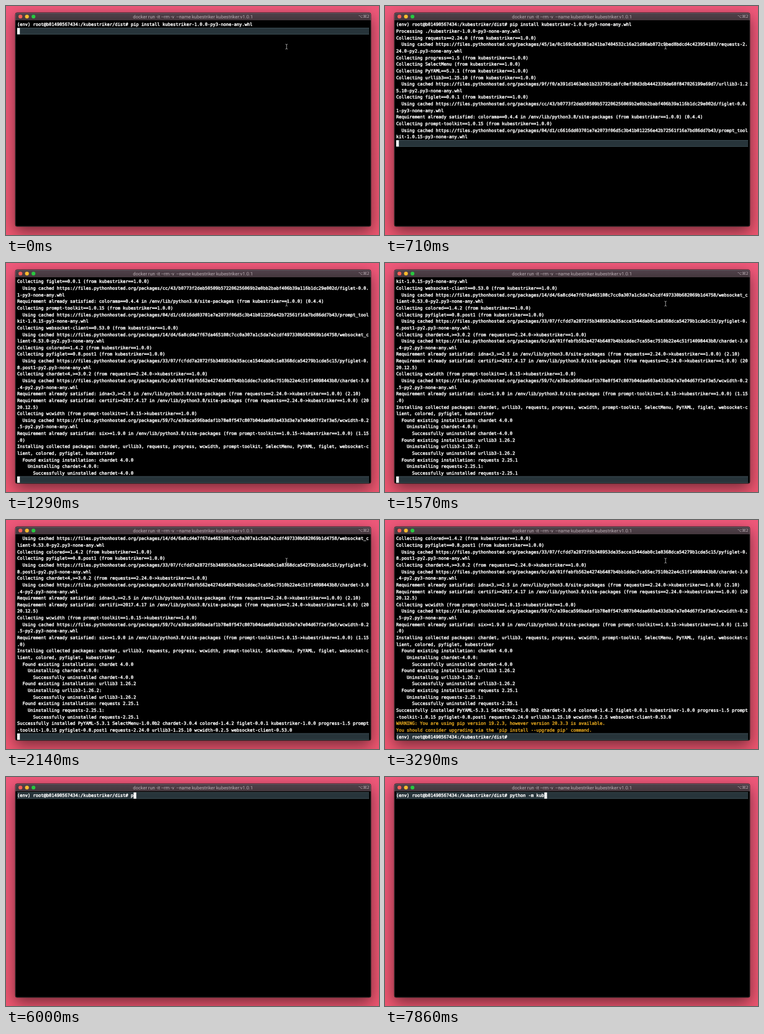
Write an HTML page with a canvas that moves like this. It is 600x369 px and loops after 8000 ms.

```html
<!DOCTYPE html>
<html lang="en">
<head>
<meta charset="utf-8">
<title>Terminal</title>
<style>
html, body { margin: 0; width: 100%; height: 100%; overflow: hidden; background: #ee5673; }
canvas { display: block; width: 600px; height: 369px; }
</style>
</head>
<body>
<canvas id="stage"></canvas>
<script>
const W = 600, H = 369, LOOP = 8000;
const COLS = 133, ROWS = 31;
const LEFT = 18, TOP = 24.5, CELL = 4.256, PITCH = 10.64;
const MONO = '7.07px "DejaVu Sans Mono", monospace';
const WHITE = '#ffffff', AMBER = '#dba01e';

const canvas = document.getElementById('stage');
const ctx = canvas.getContext('2d');
const dpr = window.devicePixelRatio || 1;
canvas.width = W * dpr;
canvas.height = H * dpr;

const PROMPT = '(env) root@b01490567434:/kubestriker/dist# ';
const OWNER = 'kubestriker==1.0.0';
const collect = (name, from = OWNER) => `Collecting ${name} (from ${from})`;
const cached = (path, file) =>
  `  Using cached https://files.pythonhosted.org/packages/${path}/${file}-none-any.whl`;
const satisfied = (name, from, version) =>
  `Requirement already satisfied: ${name} in /env/lib/python3.8/site-packages (from ${from}) (${version})`;
const uninstall = (name, version) => [
  `  Found existing installation: ${name} ${version}`,
  `    Uninstalling ${name}-${version}:`,
  `      Successfully uninstalled ${name}-${version}`
];
const viaRequests = 'requests==2.24.0->' + OWNER;
const viaToolkit = 'prompt-toolkit==1.0.15->' + OWNER;

const log = [
  PROMPT + 'pip install kubestriker-1.0.0-py3-none-any.whl',
  'Processing ./kubestriker-1.0.0-py3-none-any.whl',
  collect('requests==2.24.0'),
  cached('45/1e/0c169c6a5381e241ba7404532c16a21d86ab872c9bed8bdcd4c423954103', 'requests-2.24.0-py2.py3'),
  collect('progress==1.5'),
  collect('SelectMenu'),
  collect('PyYAML==5.3.1'),
  collect('urllib3==1.25.10'),
  cached('9f/f0/a391d1463ebb1b233795cabfc0ef38d3db4442339de68f847026199e69d7', 'urllib3-1.25.10-py2.py3'),
  collect('figlet==0.0.1'),
  cached('cc/43/b0773f2deb50509b572206256069b2e0bb2babf406b39a116b1dc29e002d', 'figlet-0.0.1-py3'),
  satisfied('colorama==0.4.4', OWNER, '0.4.4'),
  collect('prompt-toolkit==1.0.15'),
  cached('04/d1/c6616dd03701e7e2073f06d5c3b41b012256e42b72561f16a7bd86dd7b43', 'prompt_toolkit-1.0.15-py3'),
  collect('websocket-client==0.53.0'),
  cached('14/d4/6a8cd4e7f67da465108c7cc0a307a1c5da7e2cdf497330b682069b1d4758', 'websocket_client-0.53.0-py2.py3'),
  collect('colored==1.4.2'),
  collect('pyfiglet==0.8.post1'),
  cached('33/07/fcfdd7a2872f5b348953de35acce1544dab0c1e8368dca54279b1cde5c15', 'pyfiglet-0.8.post1-py2.py3'),
  collect('chardet<4,>=3.0.2', viaRequests),
  cached('bc/a9/01ffebfb562e4274b6487b4bb1ddec7ca55ec7510b22e4c51f14098443b8', 'chardet-3.0.4-py2.py3'),
  satisfied('idna<3,>=2.5', viaRequests, '2.10'),
  satisfied('certifi>=2017.4.17', viaRequests, '2020.12.5'),
  collect('wcwidth', viaToolkit),
  cached('59/7c/e39aca596badaf1b78e8f547c807b04dae603a433d3e7a7e04d67f2ef3e5', 'wcwidth-0.2.5-py2.py3'),
  satisfied('six>=1.9.0', viaToolkit, '1.15.0'),
  'Installing collected packages: chardet, urllib3, requests, progress, wcwidth, prompt-toolkit, ' +
    'SelectMenu, PyYAML, figlet, websocket-client, colored, pyfiglet, kubestriker',
  ...uninstall('chardet', '4.0.0'),
  ...uninstall('urllib3', '1.26.2'),
  ...uninstall('requests', '2.25.1'),
  'Successfully installed PyYAML-5.3.1 SelectMenu-1.0.0b2 chardet-3.0.4 colored-1.4.2 figlet-0.0.1 ' +
    'kubestriker-1.0.0 progress-1.5 prompt-toolkit-1.0.15 pyfiglet-0.8.post1 requests-2.24.0 ' +
    'urllib3-1.25.10 wcwidth-0.2.5 websocket-client-0.53.0',
  'WARNING: You are using pip version 19.2.3, however version 20.3.3 is available.',
  "You should consider upgrading via the 'pip install --upgrade pip' command."
];

// Hard wrap at the terminal width.
const rows = log.flatMap(line => {
  const color = /^(WARNING|You should)/.test(line) ? AMBER : WHITE;
  return line.match(new RegExp(`.{1,${COLS}}`, 'g')).map(text => ({ text, color }));
});

// [time, value] steps
const PRINTED = [[0, 1], [140, 2], [290, 5], [430, 8], [570, 14], [710, 18], [860, 25], [1000, 31],
  [1140, 38], [1290, 41], [1430, 44], [1570, 47], [2000, 49], [2570, 51]];
const CLEAR_TYPED = [[0, 0], [4860, 1], [5000, 2], [5140, 3], [5290, 4], [5570, 5]];
const RUN_TYPED = [[0, 0], [6000, 1], [7000, 2], [7140, 4], [7290, 6], [7430, 7], [7570, 9],
  [7710, 11], [7860, 13]];
const PROMPT_AT = 2570, CLEAR_AT = 5710, HIDE_POINTER = 4860;

const stepAt = (steps, t) => steps.filter(s => s[0] <= t).pop()[1];
const between = (t, a, b) => t >= a && t < b;

function screenAt(t) {
  if (t >= CLEAR_AT) {
    const text = PROMPT + 'python -m kub'.slice(0, stepAt(RUN_TYPED, t));
    return { lines: [{ text, color: WHITE }], col: text.length };
  }
  const lines = rows.slice(0, stepAt(PRINTED, t));
  const text = t < PROMPT_AT ? '' : PROMPT + 'clear'.slice(0, stepAt(CLEAR_TYPED, t));
  lines.push({ text, color: WHITE });
  return { lines: lines.slice(-ROWS), col: text.length };
}

// A thin outline of the same colour gives the text a heavier weight.
function write(text, x, y, font, color, { align = 'left', outline = 0 } = {}) {
  ctx.font = font;
  ctx.fillStyle = color;
  ctx.textAlign = align;
  ctx.fillText(text, x, y);
  if (outline) {
    ctx.strokeStyle = color;
    ctx.lineWidth = outline;
    ctx.lineJoin = 'round';
    ctx.strokeText(text, x, y);
  }
}

function panel(x, y, w, h, r) {
  ctx.beginPath();
  ctx.roundRect(x, y, w, h, r);
}

function drawDesktop() {
  const g = ctx.createLinearGradient(0, 0, 0, H);
  g.addColorStop(0, '#f0587a');
  g.addColorStop(1, '#ee5670');
  ctx.fillStyle = g;
  ctx.fillRect(0, 0, W, H);
}

function drawWindow() {
  ctx.save();
  ctx.shadowColor = 'rgba(0,0,0,.5)';
  ctx.shadowBlur = 23 * dpr;
  ctx.shadowOffsetY = 8 * dpr;
  ctx.fillStyle = '#000';
  panel(14.7, 10.6, 572.6, 345, 3.5);
  ctx.fill();
  ctx.restore();

  const g = ctx.createLinearGradient(0, 11, 0, 23);
  g.addColorStop(0, '#50414a');
  g.addColorStop(1, '#44373d');
  ctx.fillStyle = g;
  panel(15, 11, 572, 12, [3, 3, 0, 0]);
  ctx.fill();

  ctx.strokeStyle = 'rgba(255,255,255,.24)';
  ctx.lineWidth = 0.6;
  panel(15.3, 11.3, 571.4, 343.6, 3);
  ctx.stroke();

  ['#ff5f57', '#febc2e', '#28c840'].forEach((color, i) => {
    ctx.fillStyle = color;
    ctx.beginPath();
    ctx.arc(23.2 + i * 10.5, 17, 3.1, 0, 7);
    ctx.fill();
  });
  write('docker run -it --rm -v  --name kubestriker kubestriker:v1.0.1',
    300.7, 19.6, '7.5px Roboto, sans-serif', '#b9adb3', { align: 'center' });
  write('⌥⌘2', 584.6, 19.4, '6.4px "DejaVu Sans", sans-serif', '#b9adb3', { align: 'right' });
}

function drawPointer(x, y) {
  ctx.strokeStyle = '#b4b4b4';
  ctx.lineWidth = 0.8;
  ctx.beginPath();
  ctx.moveTo(x - 1.8, y - 4);
  ctx.quadraticCurveTo(x, y - 4, x, y - 2.5);
  ctx.quadraticCurveTo(x, y - 4, x + 1.8, y - 4);
  ctx.moveTo(x, y - 3);
  ctx.lineTo(x, y + 3);
  ctx.moveTo(x - 1.8, y + 4);
  ctx.quadraticCurveTo(x, y + 4, x, y + 2.5);
  ctx.quadraticCurveTo(x, y + 4, x + 1.8, y + 4);
  ctx.stroke();
}

function drawScreen(t) {
  const { lines, col } = screenAt(t);
  const y = TOP + (lines.length - 1) * PITCH;

  ctx.fillStyle = '#27343a';
  ctx.fillRect(LEFT, y, COLS * CELL, PITCH);
  ctx.fillStyle = '#45565d';
  ctx.fillRect(LEFT, y, COLS * CELL, 0.7);
  ctx.fillRect(LEFT, y + PITCH - 0.7, COLS * CELL, 0.7);

  lines.forEach((line, i) =>
    write(line.text, LEFT, TOP + 7.9 + i * PITCH, MONO, line.color, { outline: 0.4 }));

  const blinkOff = between(t, 3000, 3570) || between(t, 4140, 4710);
  if (!blinkOff) {
    ctx.fillStyle = '#fff';
    ctx.fillRect(LEFT + col * CELL, y + 0.3, CELL, PITCH - 0.5);
  }
  if (t < HIDE_POINTER) drawPointer(451.3, 65.5);
}

function draw(now) {
  ctx.setTransform(dpr, 0, 0, dpr, 0, 0);
  ctx.textRendering = 'geometricPrecision';
  drawDesktop();
  drawWindow();
  drawScreen(now % LOOP);
}

let start = null;
function tick(now) {
  if (start === null) start = now;
  draw(now - start);
  requestAnimationFrame(tick);
}
draw(0);
requestAnimationFrame(tick);
</script>
</body>
</html>
```
